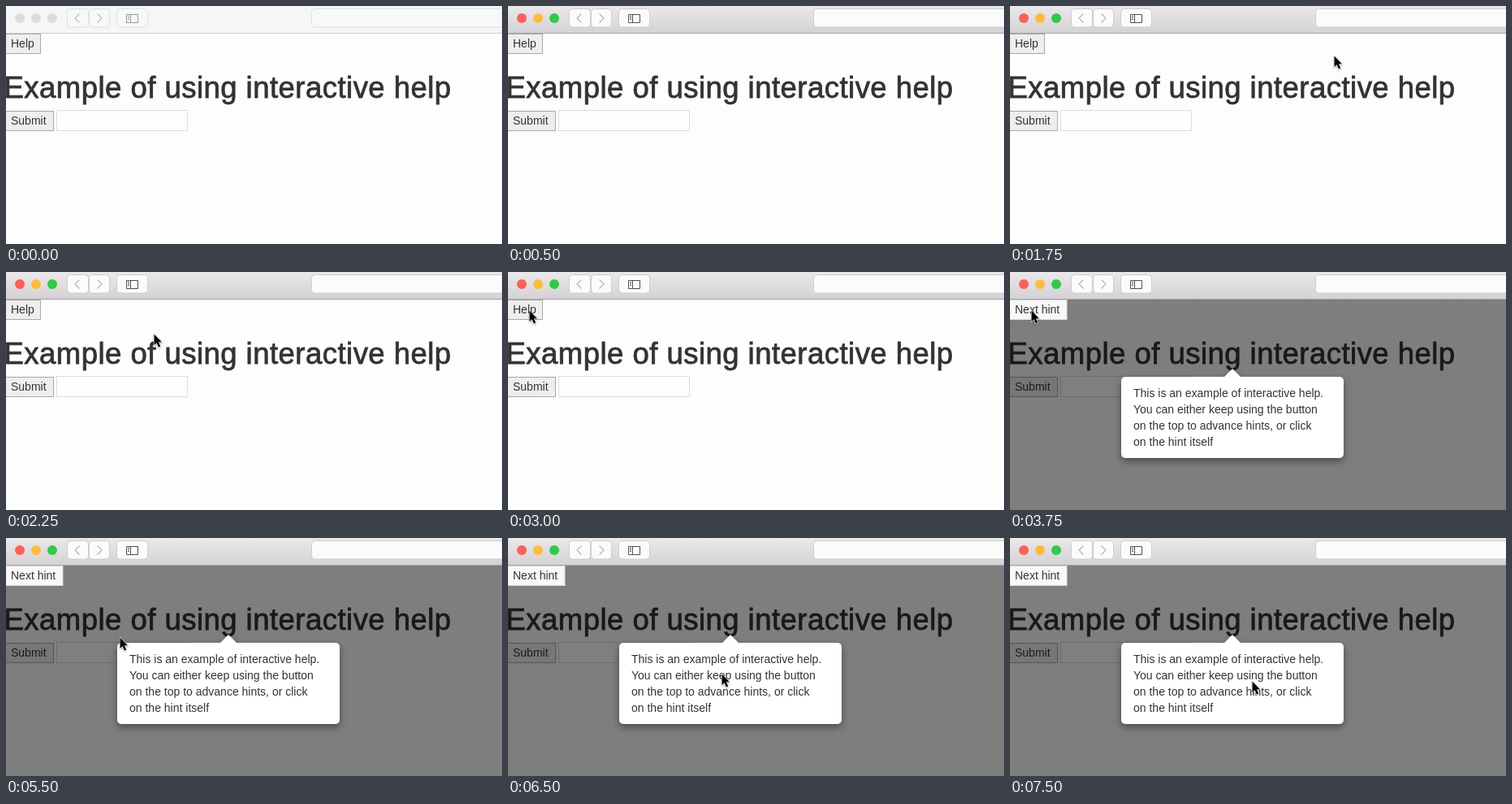
Write an HTML page that moves like this. It is 611x293 px and loops after 8000 ms.

```html
<!DOCTYPE html>
<html lang="en">
<head>
<meta charset="utf-8">
<title>Interactive help</title>
<style>
  html, body { margin: 0; width: 100%; height: 100%; overflow: hidden; background: #fdfdfd; }
  svg { display: block; width: 611px; height: 293px; }
  text { font: 14px "Liberation Sans", Arial, sans-serif; fill: #333; white-space: pre; }
  .title { font-size: 36.5px; letter-spacing: .47px; stroke: #333; stroke-width: .8px; }
  .btn { fill: #eee; stroke: #a8a8a8; }
  .line { fill: none; stroke-width: 1.2; }
  #popover rect, #popover path { fill: #fff; }
  #popover .card { filter: drop-shadow(0 4px 5px rgba(0, 0, 0, .4)); }
</style>
</head>
<body>
<svg viewBox="0 0 611 293">
  <defs>
    <linearGradient id="steel" x2="0" y2="1">
      <stop stop-color="#eae8ea"/>
      <stop offset="1" stop-color="#d4d2d4"/>
    </linearGradient>
  </defs>
  <rect width="611" height="293" fill="#fdfdfd"/>

  <g id="help">
    <rect class="btn" x="-1.5" y="34.5" width="44" height="24"/>
    <text x="6" y="51">Help</text>
  </g>
  <text class="title" x="-2.5" y="112.5">Example of using interactive help</text>
  <rect class="btn" x="-1.5" y="129.5" width="60" height="24"/>
  <text x="6" y="146">Submit</text>
  <rect x="62.5" y="128.5" width="161" height="25" fill="#fefefe" stroke="#dcdcdc"/>

  <g id="shade">
    <rect y="34" width="611" height="259" opacity=".5"/>
    <rect x="-1.5" y="34.5" width="71.5" height="24" fill="#f8f8f8" stroke="#d8d8d8"/>
    <text x="6" y="51">Next hint</text>
  </g>

  <g id="popover">
    <g class="card">
      <rect x="137" y="129" width="274" height="100" rx="5"/>
      <path d="M263 130L274 119L285 130Z"/>
    </g>
    <g id="hint"></g>
  </g>

  <g id="idle"></g>
  <g id="active"></g>

  <g id="cursor">
    <path d="M.5 .5V14L3.6 11.2L5.9 16.6L8.2 15.6L5.9 10.3H10Z"
      fill="#000" stroke="#fff" stroke-width="1.1" paint-order="stroke"
      style="filter: drop-shadow(0 1px 1px rgba(0, 0, 0, .35))"/>
  </g>
</svg>
<script>
  const LOOP = 8000;
  const $ = id => document.getElementById(id);

  function toolbar({ bar, edge, dots, rim, arrow, icon, box }) {
    const field = (x, w) =>
      `<rect x="${x}.5" y="3.5" width="${w}" height="22.5" rx="4" fill="${box}" stroke="${rim}"/>`;
    return `<rect width="611" height="33" fill="${bar}"/>
      <rect y="33" width="611" height="1" fill="${edge}"/>
      ${dots.map((c, i) => `<circle cx="${17 + 20 * i}" cy="15" r="6" fill="${c}"/>`).join("")}
      ${field(75, 26)}${field(102, 25)}${field(136, 38)}${field(376, 260)}
      <path class="line" stroke="${arrow}" d="M90.5 9.5L85 15L90.5 20.5M112.5 9.5L118 15L112.5 20.5"/>
      <path class="line" style="stroke-width:1" stroke="${icon}"
        d="M148.5 10.5H162.5V20.5H148.5ZM153.5 10.5V20.5M150 12.5H152M150 14.5H152M150 16.5H152"/>`;
  }

  $("idle").innerHTML = toolbar({
    bar: "#f6f6f6", edge: "#cfcfc8", dots: ["#dcdcdc", "#dcdcdc", "#dcdcdc"],
    rim: "#dbe3e7", arrow: "#bdbdbd", icon: "#9a9a9a", box: "#f8f8f8"
  });
  $("active").innerHTML = toolbar({
    bar: "url(#steel)", edge: "#a5a3a5", dots: ["#fc605b", "#fdbc40", "#34c84a"],
    rim: "#cfcdcf", arrow: "#b4b4b4", icon: "#505050", box: "#fbfbfb"
  });

  $("hint").innerHTML = [
    "This is an example of interactive help.",
    "You can either keep using the button",
    "on the top to advance hints, or click",
    "on the hint itself"
  ].map((s, i) => `<text x="152" y="${154 + 20 * i}">${s}</text>`).join("");

  // Each step is [start in ms, value]; values hold until the next step.
  function play(id, prop, steps) {
    const last = steps[steps.length - 1][1];
    const frames = [...steps, [LOOP, last]].map(([ms, v]) =>
      ({ offset: ms / LOOP, [prop]: v, easing: "step-end" }));
    return $(id).animate(frames, { duration: LOOP, iterations: Infinity });
  }

  const path = [
    [0, -40, -40], [1750, 399, 61], [2000, 382, 53], [2250, 182, 76],
    [2500, 86, 52], [2750, 30, 48], [3000, 26, 47], [5500, 140, 122],
    [5750, 147, 148], [6000, 150, 157], [6250, 201, 160], [6500, 263, 167],
    [6750, 295, 175], [7000, 298, 176]
  ];

  const runs = [
    play("active", "opacity", [[0, 0], [500, 1]]),
    play("help", "opacity", [[0, 1], [3500, 0]]),
    play("shade", "opacity", [[0, 0], [3500, 1]]),
    play("popover", "opacity", [[0, 0], [3500, .02], [3750, 1]]),
    play("cursor", "transform", path.map(([ms, x, y]) => [ms, `translate(${x}px, ${y}px)`]))
  ];
  const start = document.timeline.currentTime;
  runs.forEach(run => run.startTime = start);
</script>
</body>
</html>
```
